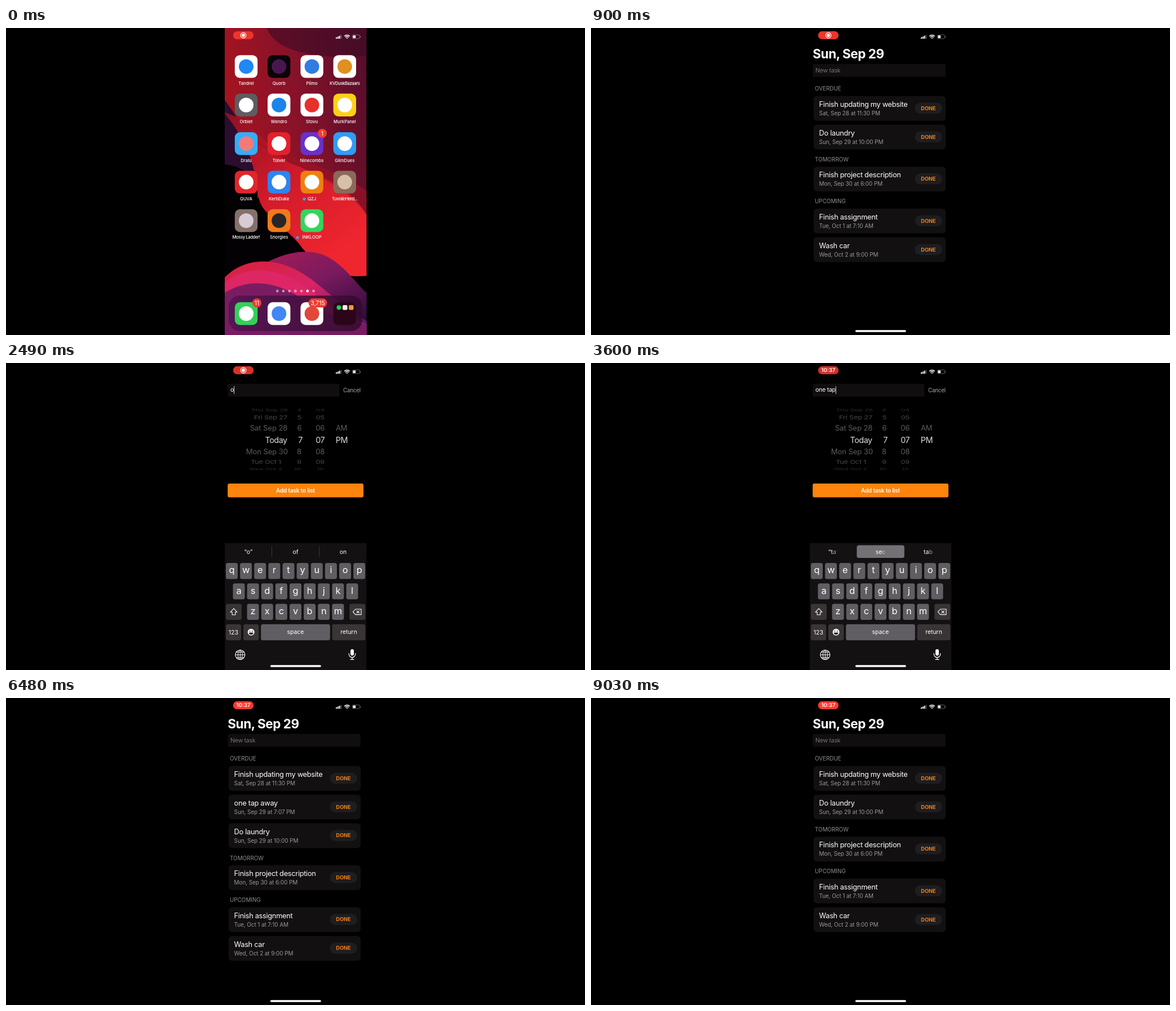
Animation, 1027 px wide and 545 px high, one loop 9.18 s. Source, as an HTML page:

```html
<!DOCTYPE html>
<html lang="en">
<head>
<meta charset="utf-8">
<title>Task list</title>
<style>
html, body { margin: 0; width: 100%; height: 100%; overflow: hidden; background: #000; }
svg { display: block; width: 100vw; height: 100vh; }
text { font-family: Inter, Roboto, sans-serif; white-space: pre; }
#list { mix-blend-mode: screen; }
</style>
</head>
<body>
<svg id="stage" viewBox="0 0 1027 545"></svg>
<script>
const LOOP = 9180;
const ORANGE = '#fd840d';
const $ = id => document.getElementById(id);
const clamp = v => Math.max(0, Math.min(1, v));
const mix = (a, b, k) => a + (b - a) * k;
const smooth = (t, start, length) => {
  const k = clamp((t - start) / length);
  return k * k * (3 - 2 * k);
};

// Markup helpers; text is placed by its vertical centre
const text = (x, y, s, size, fill = '#fff', o = {}) =>
  `<text x="${x}" y="${y + size * .364}" font-size="${size}" fill="${fill}" text-anchor="${o.at || 'start'}" ` +
  `font-weight="${o.w || 400}" letter-spacing="${o.ls || 0}" ${o.more || ''}>${s}</text>`;
const mid = (x, y, s, size, fill, o = {}) => text(x, y, s, size, fill, { ...o, at: 'middle' });
const box = (x, y, w, h, r, fill, more = '') =>
  `<rect x="${x}" y="${y}" width="${w}" height="${h}" rx="${r}" fill="${fill}" ${more}/>`;
const dot = (x, y, r, fill, more = '') => `<circle cx="${x}" cy="${y}" r="${r}" fill="${fill}" ${more}/>`;
const shape = (d, fill, opacity = 1) => `<path d="${d}" fill="${fill}" opacity="${opacity}"/>`;
const line = (d, w = 1, more = '') =>
  `<path d="${d}" fill="none" stroke="#fff" stroke-width="${w}" stroke-linecap="round" stroke-linejoin="round" ${more}/>`;
const gradient = (id, x1, y1, x2, y2, ...stops) =>
  `<linearGradient id="${id}" x1="${x1}" y1="${y1}" x2="${x2}" y2="${y2}">` +
  stops.map((c, i) => `<stop offset="${i / (stops.length - 1)}" stop-color="${c}"/>`).join('') + '</linearGradient>';

// Home screen
const COLS = [426, 484.2, 542.6, 600.8];
const APPS = [
  ['Tandrel', '#fff', '#1e88f7'], ['Quorb', '#0a0508', '#4a1650'], ['Plimo', '#fff', '#2f7de1'], ['KVDuskBazaars', '#fff', '#e0901e'],
  ['Orblet', '#5d5d61', '#fff'], ['Wendro', '#fff', '#1d84ea'], ['Stovu', '#fff', '#e8302a'], ['MurkPanel', '#fbd116', '#fff'],
  ['Dralu', '#35aef5', '#f47a7a'], ['Tolver', '#e3212c', '#fff'], ['Ninecombs', '#6a30cc', '#fff'], ['GlimDues', '#2f9df4', '#fff'],
  ['QUVA', '#e0262c', '#fff'], ['KerbDuke', '#2a86f0', '#fff'], ['QZJ', '#ee8010', '#fff'], ['TuvolinHerd...', '#8a6a5a', '#d8c0a8'],
  ['Mossy Ladder!', '#86706c', '#d8ccd4'], ['Snorgles', '#f07a1a', '#2a2526'], ['INKLOOP', '#34d55c', '#fff']
];
const tile = (x, y, back, mark) => box(x - 20.2, y - 20.2, 40.4, 40.4, 9, back) + dot(x, y, 13, mark);
const badge = (x, y, s, w = 16) => box(x - w / 2, y - 8, w, 16, 8, '#f23b30') + mid(x, y, s, 10.5);

function appIcon([name, back, mark], i) {
  const x = COLS[i % 4], y = 68.4 + 68.4 * Math.floor(i / 4);
  const ls = name.length > 12 ? -.42 : 0;
  return tile(x, y, back, mark) + mid(x, y + 29.6, name, 7.7, '#fff', { w: 500, ls });
}

const wallpaper = () =>
  box(388, 0, 251.5, 545, 0, 'url(#sky)') +
  shape('M462 0C478 40 540 56 640 50V0Z', '#3c0a26', .6) +
  shape('M388 128C412 160 436 200 446 262L388 250Z', '#2b0d30') +
  shape('M388 242Q425 246 446 275V300L520 370 640 436V545H388Z', '#030103') +
  shape('M388 150C430 160 470 215 500 238C560 262 610 280 640 332V440C585 445 555 425 525 390C505 362 470 340 455 318C447 305 446 290 444 278C440 235 420 190 388 152Z', 'url(#ribbon)') +
  shape('M440 200C500 245 600 270 640 332V290C590 250 500 230 440 200Z', '#a01224', .6) +
  shape('M440 430C490 395 540 390 570 406C605 425 625 460 640 470V545H440Z', 'url(#hill)') +
  shape('M388 443C420 410 470 405 520 432C560 455 600 500 640 520V545H388Z', 'url(#pink)') +
  shape('M388 453C420 422 475 424 520 452C555 476 600 512 640 526V545H388Z', '#e0276a', .8) +
  shape('M388 470C430 444 480 448 530 484C560 504 600 518 640 526V545H388Z', '#6a1a62', .85);

const home = () =>
  `<g id="wall">${wallpaper()}</g><g id="icons">` + APPS.map(appIcon).join('') +
  badge(561, 187, '1') + dot(529, 303.5, 2.6, '#3fa2e8') + dot(517, 372, 2.6, '#3fa2e8') +
  Array.from({ length: 7 }, (_, i) => dot(481.3 + 10.7 * i, 467, 2.4, '#fff', `opacity="${i == 5 ? 1 : .5}"`)).join('') +
  box(395, 475, 237, 63, 20, 'url(#dock)', 'opacity=".85"') +
  tile(COLS[0], 507, '#34d058', '#fff') + tile(COLS[1], 507, '#fff', '#4285f4') + tile(COLS[2], 507, '#fff', '#e0483b') +
  box(580.5, 487, 40.4, 40.4, 9, '#2c0618') +
  dot(590.5, 496.3, 4, '#1ed05f') + box(597, 492, 8.5, 8.5, 2, '#f4f0f4') + box(608, 492, 8.5, 8.5, 2, '#e89a3a') +
  badge(445, 488, '11') + badge(553, 488, '3,715', 33) + '</g>';

// Status bar
const pill = () =>
  `<g id="pill">${box(402.8, 5.8, 36.4, 14.2, 7.1, '#ff3b30', 'id="pillBack"')}` +
  `<g id="rec">${dot(421, 13, 4.9, 'none', 'stroke="#fff" stroke-width="1.1"')}${dot(421, 13, 2.9, '#fff')}</g>` +
  mid(421, 13, '10:37', 9.5, '#fff', { w: 600, more: 'id="clock"' }) + '</g>';
const signal = () =>
  '<g id="signal">' + [0, 1, 2, 3].map(i =>
    box(585 + 2.8 * i, 16.6 - 1.4 * i, 2, 2.4 + 1.4 * i, .5, '#fff', i == 3 ? 'opacity=".3"' : '')).join('') +
  line('M600.6 14.2A6.4 6.4 0 0 1 609.4 14.2M602.5 16.2A3.6 3.6 0 0 1 607.5 16.2', 1.5) + dot(605, 18, 1.1, '#fff') +
  box(614.4, 12.2, 13, 6.8, 2, 'none', 'stroke="#fff" stroke-width=".7" opacity=".5"') +
  box(615.5, 13.3, 4.6, 4.6, 1, '#fff') + box(628.2, 14.4, 1.1, 2.4, .5, '#fff', 'opacity=".5"') + '</g>';

// Task list
const head = (y, s) => text(397, y, s, 9.9, '#8f8f93');
const row = (y, name, when, more = '') =>
  `<g ${more}>` + box(394.8, y, 234.4, 44, 6, '#121011') +
  text(404.6, y + 14.6, name, 12.8, '#fff', { ls: -.3 }) +
  text(404.6, y + 30.5, when, 10, '#98989c', { ls: -.1 }) +
  box(574.5, y + 11.8, 48.5, 19.6, 9.8, '#1e1d20') +
  mid(598.5, y + 21.6, 'DONE', 9.2, '#f08018', { w: 700 }) + '</g>';
const list = () =>
  '<g id="list">' + text(393.3, 46, 'Sun, Sep 29', 22.5, '#fff', { w: 700, ls: -.45 }) + head(107.5, 'OVERDUE') +
  row(120.8, 'Finish updating my website', 'Sat, Sep 28 at 11:30 PM') +
  row(171.6, 'one tap away', 'Sun, Sep 29 at 7:07 PM', 'id="added"') +
  `<g id="ghost">${head(182, 'TODAY')}<use href="#rest" y="23.4"/></g>` +
  '<g id="rest">' + row(171.6, 'Do laundry', 'Sun, Sep 29 at 10:00 PM') +
  head(233.3, 'TOMORROW') + row(246.2, 'Finish project description', 'Mon, Sep 30 at 6:00 PM') +
  head(307.8, 'UPCOMING') + row(320.6, 'Finish assignment', 'Tue, Oct 1 at 7:10 AM') +
  row(371.6, 'Wash car', 'Wed, Oct 2 at 9:00 PM') + '</g></g>';

const field = () =>
  '<g id="field">' + box(393.3, 36.8, 198, 23, 3, '#110e0f', 'id="fieldBack"') +
  text(398, 48, 'New task', 10.6, '#747478', { ls: -.27, more: 'id="hint"' }) +
  text(398, 47.6, '', 10.6, '#fff', { ls: -.27, more: 'id="typed"' }) +
  box(398, 41, 1, 14, .4, '#d0d0d0', 'id="caret"') + '</g>';

// Date picker: y, flattening, size, grey, date, right edge, hour, hour x, minute
const WHEEL = [
  [84, .45, 12.3, '#2c2c2c', 'Thu Sep 26', 500, 4, 520, '04'],
  [97, .75, 12.7, '#474747', 'Fri Sep 27', 499, 5, 520.5, '05'],
  [115.3, .95, 13.2, '#5c5c5c', 'Sat Sep 28', 499.3, 6, 520.5, '06'],
  [136.4, 1, 14.4, '#dcdcdc', 'Today', 498.6, 7, 522, '07'],
  [157.4, .95, 13.2, '#5c5c5c', 'Mon Sep 30', 500, 8, 520, '08'],
  [175.3, .75, 12.6, '#474747', 'Tue Oct 1', 488, 9, 520, '09'],
  [188, .45, 12.2, '#2c2c2c', 'Wed Oct 2', 490, 10, 517, '10']
];
const wheelRow = ([y, flat, size, grey, date, right, hour, hx, minute]) => {
  const o = { ls: size > 14 ? -.5 : -.15 };
  return `<g transform="translate(0 ${y}) scale(1 ${flat})">` + text(right, 0, date, size, grey, { ...o, at: 'end' }) +
    mid(hx, 0, hour, size, grey, o) + mid(557.3, 0, minute, size, grey, o) + '</g>';
};
const modal = () =>
  '<g id="modal">' + text(598, 48.4, 'Cancel', 9.9, '#a4a4a6', { ls: -.25 }) + WHEEL.map(wheelRow).join('') +
  mid(595, 115.3, 'AM', 13, '#5c5c5c', { ls: -.3 }) + mid(595.5, 136.4, 'PM', 14.4, '#dcdcdc', { ls: -.3 }) +
  box(393.2, 214, 240.8, 24.4, 3, ORANGE) +
  mid(513.5, 226.2, 'Add task to list', 9.9, '#fff', { w: 600, ls: -.1, more: 'id="addLabel"' }) + '</g>';

// Keyboard
const keys = {};
const keyRow = (letters, x0, y) => [...letters].map((c, i) => {
  const x = x0 + 25.13 * i;
  keys[c] = [x, y];
  return box(x, y, 21, 28.4, 3.5, '#605e62') + mid(x + 10.5, y + 12.4, c, 16.4);
}).join('');
const darkKey = (x, y, w) => box(x, y, w, 28.4, 3.5, '#393436');
const keyboard = () =>
  '<g id="keyboard">' + box(388, 319.6, 251.5, 226, 0, '#131112') +
  line('M471.5 326V344M555.5 326V344', .7, 'opacity=".22"') + box(471.7, 323.5, 84, 22.5, 3.5, '#737175', 'id="pick"') +
  [430, 513.5, 598].map((x, i) => mid(x, 335, '', 10.5, '#fff', { more: `id="word${i}"` })).join('') +
  keyRow('qwertyuiop', 390, 355) + keyRow('asdfghjkl', 402.5, 391.2) + keyRow('zxcvbnm', 427.6, 427.5) +
  darkKey(390, 427.5, 28) + line('M404 435.8L410 442.3H406.8V447H401.2V442.3H398Z', 1.1) +
  darkKey(609.2, 427.5, 28.2) + line('M619.8 437H630V446.6H619.8L615.4 441.8ZM622 439.8L626.6 444M626.6 439.8L622 444', 1.1) +
  darkKey(390, 463.8, 27) + mid(403.4, 478, '123', 10.6) +
  darkKey(421, 463.8, 27.4) + dot(434.7, 477.8, 6, '#fff') + dot(432.6, 476, .9, '#222') + dot(436.8, 476, .9, '#222') +
  shape('M430.8 478.6H438.6A3.9 3.6 0 0 1 430.8 478.6Z', '#222') +
  box(452.2, 463.8, 122.6, 28.4, 3.5, '#605e62', 'id="space"') + mid(513.4, 477.6, 'space', 10.4) +
  darkKey(578.6, 463.8, 58.8) + mid(608, 477.6, 'return', 10.4) +
  line('M406.8 518H423.8M415.3 509.5V526.5M408.7 513.2H421.9M408.7 522.8H421.9', 1) +
  dot(415.3, 518, 8.5, 'none', 'stroke="#fff" stroke-width="1.1"') +
  '<ellipse cx="415.3" cy="518" rx="4" ry="8.5" fill="none" stroke="#fff"/>' +
  box(611, 508, 6, 11.5, 3, '#fff') + line('M608.3 515.5V517A5.7 5.7 0 0 0 619.7 517V515.5M614 523V526.4M611 526.4H617', 1.2) +
  '<g id="pop">' + box(-6, -39, 33, 46, 7, '#6c6a6e') + box(0, 0, 21, 28.4, 3.5, '#6c6a6e') +
  mid(10.5, -18, '', 23, '#fff', { more: 'id="popText"' }) + '</g></g>';

$('stage').innerHTML =
  '<defs>' + gradient('sky', 0, .35, 1, 0, '#a8141f', '#86122a', '#540d2a') +
  gradient('ribbon', 0, 0, .6, 1, '#8c1024', '#d01a2a', '#f0262f') +
  gradient('hill', 0, 0, .7, 1, '#a81c56', '#7a1a5e', '#2c0c3c') +
  gradient('pink', 0, 0, .7, 1, '#d82038', '#d82468', '#58186c') +
  gradient('dock', 0, 0, 1, 0, '#4e1450', '#42103f', '#340a2c') +
  '<filter id="haze"><feGaussianBlur class="blur"/></filter>' +
  '<filter id="grey"><feColorMatrix type="saturate" values=".3"/><feGaussianBlur class="blur"/></filter>' +
  '<clipPath id="phone"><rect x="388" width="251.5" height="545"/></clipPath>' +
  '<clipPath id="window"><rect id="frame"/></clipPath></defs>' +
  box(0, 0, 1027, 545, 0, '#000') +
  `<g clip-path="url(#phone)"><g id="home">${home()}${box(388, 0, 251.5, 545, 0, '#000', 'id="shade"')}` +
  '<use id="homePill" href="#pill"/><use id="homeSignal" href="#signal"/></g>' +
  `<g id="shell" clip-path="url(#window)">${box(388, 0, 252, 545, 0, '#000')}<g id="app">` +
  modal() + field() + list() + keyboard() + pill() + signal() + box(468.8, 536.2, 90, 3.6, 1.8, '#fff') +
  `</g><g id="launch">${box(-20.2, -20.2, 40.4, 60, 0, '#0a0508')}${dot(0, 0, 13, '#4a1650')}</g></g></g>`;

const set = (id, attrs) => { for (const k in attrs) $(id).setAttribute(k, attrs[k]); };
const fade = (id, v) => set(id, { opacity: v, display: v > .001 ? 'inline' : 'none' });
const shift = (id, y) => set(id, { transform: `translate(0 ${y})` });

// Each keystroke with the suggestions that follow it
const PHRASE = 'one tap away';
const STROKES = [
  [1790, 'websites|websites|'], [2350, '“o”|of|on'], [2520, 'on|one|only'], [2700, 'one|ones|once'],
  [2960, 'of|more|day'], [3180, 'the|to|that'], [3340, '“ta”|take|tall'], [3490, '“ta”|sec|tab'],
  [3850, 'on|the|and'], [4020, 'a|and|at'], [4200, '“aw”|away|awesome'], [4360, '“awa”|away|award'], [4560, '“away”|always|']
];

function drawLaunch(t) {
  const k = Math.max(0, t - 206) * .015;
  const p = t > 850 ? 1 : 1 - (1 + k) * Math.exp(-k);
  const w = mix(40.4, 251.5, p), h = mix(40.4, 545, Math.pow(p, 1.44));
  const x = mix(COLS[1], 513.75, p) - w / 2, y = mix(68.4, 272.5, p) - h / 2, s = w / 251.5;
  const reveal = clamp(p * 2.4 - .5);
  set('home', { display: p < 1 ? 'inline' : 'none' });
  set('shell', { display: p > 0 ? 'inline' : 'none' });
  set('frame', { x, y, width: w, height: h, rx: p < 1 ? mix(9, 28, p) : 0 });
  set('app', { transform: `translate(${x} ${y}) scale(${s}) translate(-388 0)`, opacity: reveal });
  set('launch', { transform: `translate(${x + w / 2} ${y + w / 2}) scale(${w / 40.4})` });
  fade('launch', 1 - reveal);
  if (p == 1) return;
  const z = 1 - .115 * p;
  set('icons', {
    transform: `translate(514 367) scale(${z}) translate(-514 -367)`,
    opacity: 1 - .4 * p,
    filter: p > 0 ? 'url(#grey)' : 'none'
  });
  set('wall', { filter: p > 0 ? 'url(#haze)' : 'none' });
  for (const blur of document.querySelectorAll('.blur')) blur.setAttribute('stdDeviation', 8 * p);
  fade('shade', .52 * p);
  fade('homePill', 1 - clamp(p * 3));
  fade('homeSignal', 1 - .8 * p);
}

function drawList(t, open) {
  const fresh = smooth(t, 310, 280);
  const gone = smooth(t, 8480, 320);
  const added = t > 5260 ? 1 - gone : 0;
  fade('list', 1 - open);
  shift('list', -27 * open);
  fade('added', added);
  shift('rest', 50.9 * added);
  fade('ghost', 1 - fresh);
  set('rest', { opacity: mix(.45, 1, fresh) });
}

function drawKeys(t) {
  const n = STROKES.filter(s => t >= s[0]).length - 1;
  const [when, words] = STROKES[Math.max(0, n)];
  words.split('|').forEach((word, i) => {
    $('word' + i).innerHTML = [...word].map((c, j) =>
      `<tspan fill-opacity="${clamp((t - when - 35 * j) / 70)}">${c}</tspan>`).join('');
  });
  fade('pick', n == 7 ? 1 : 0);
  const hit = n > 0 && t - when < 90 ? PHRASE[n - 1] : '';
  set('space', { fill: hit == ' ' ? '#393436' : '#605e62' });
  fade('pop', keys[hit] ? 1 : 0);
  if (keys[hit]) {
    set('pop', { transform: `translate(${keys[hit]})` });
    $('popText').textContent = hit;
  }
  const typed = t < 5260 ? PHRASE.slice(0, Math.max(0, n)) : '';
  $('typed').textContent = typed;
  fade('hint', typed ? 0 : 1);
  set('caret', { x: 398 + (typed ? $('typed').getComputedTextLength() : 0) });
}

function draw(t) {
  const open = smooth(t, 1770, 240) - smooth(t, 5260, 240);
  const up = smooth(t, 1770, 280) - smooth(t, 5260, 280);
  drawLaunch(t);
  drawList(t, open);
  drawKeys(t);
  fade('modal', open);
  shift('modal', 27 * (1 - open));
  shift('field', 27 * (1 - open));
  set('fieldBack', { width: mix(235.5, 198, open) });
  fade('caret', open);
  fade('addLabel', 1 - clamp((t - 5080) / 70));
  fade('keyboard', up > 0 ? 1 : 0);
  shift('keyboard', 226 * (1 - up));
  const time = smooth(t, 2500, 250);
  fade('rec', 1 - time);
  fade('clock', time);
  set('pillBack', { opacity: .92 - .08 * Math.cos(t / 1200 * 2 * Math.PI) });
}

let start;
function tick(now) {
  start ??= now;
  draw((now - start) % LOOP);
  requestAnimationFrame(tick);
}
draw(0);
requestAnimationFrame(tick);
</script>
</body>
</html>
```
